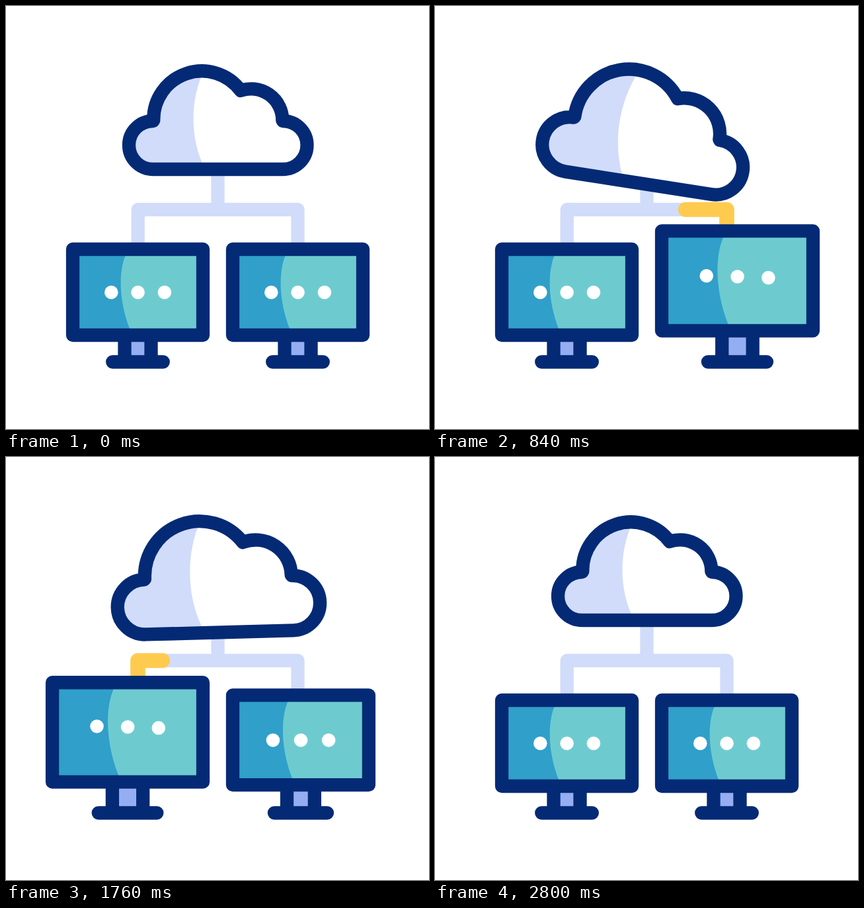
An HTML page for the animation above (3000 ms loop, 640 px wide and 640 px high).

```html
<!DOCTYPE html>
<html lang="en">
<head>
<meta charset="utf-8">
<title>Cloud network</title>
<style>
  @property --tail { syntax: "<length>"; inherits: false; initial-value: 251px; }
  @property --head { syntax: "<length>"; inherits: false; initial-value: 251px; }

  html, body { margin: 0; height: 100%; overflow: hidden; background: #fff; }
  svg { display: block; width: 640px; height: 640px; }

  path, rect { vector-effect: non-scaling-stroke; }
  .line {
    fill: none; stroke: #042a75; stroke-width: 20.3;
    stroke-linecap: round; stroke-linejoin: round;
  }
  .wire { stroke: #d1dcfa; }
  .pulse {
    stroke: #ffcb4f; stroke-width: 22.6;
    stroke-dasharray: calc(var(--head) - var(--tail)) 999px;
    stroke-dashoffset: calc(var(--tail) * -1);
  }
  .dot { stroke: #fff; stroke-width: 20.6; }

  .anim {
    animation-duration: 3s;
    animation-iteration-count: infinite;
    animation-timing-function: cubic-bezier(.333, 0, .667, 1);
    animation-delay: var(--delay, 0s);
  }

  .cloud { transform-origin: 320.8px 173px; animation-name: bob, tilt, swell; }
  .monitor { animation-name: grow; }
  .right { --big: 1.162; transform-origin: 343px 538.5px; }
  .left { --big: 1.157; transform-origin: 298px 538.5px; --delay: -2.1s; }
  .pulse { animation-name: head, tail; }
  .dot { animation-name: wave; --delay: calc(var(--start) + var(--i) * 35ms); }
  .right .dot { --start: 0s; }
  .left .dot { --start: -2.12s; }

  @keyframes bob {
    0%, 6.667% { translate: 0 0; }
    25.667% { translate: 0 13.4px; }
    44.333% { translate: 0 -24.5px; }
    63% { translate: 0 13.4px; }
    82%, 100% { translate: 0 0; }
  }
  @keyframes tilt {
    0%, 6.667% { rotate: 0deg; }
    28.667% { rotate: 8.9deg; }
    50.667% { rotate: -8.9deg; }
    66.167% { rotate: 5deg; }
    82%, 100% { rotate: 0deg; }
  }
  @keyframes swell {
    0%, 6.667% { scale: 1; }
    20%, 68.667% { scale: 1.137; }
    82%, 100% { scale: 1; }
  }
  @keyframes grow {
    0%, 6.667% { scale: 1; }
    20%, 50% { scale: var(--big); }
    63.333%, 100% { scale: 1; }
  }
  @keyframes head {
    0%, 15.33% { --head: 251px; }
    15.333% { --head: 0px; }
    25.333%, 100% { --head: 251px; }
  }
  @keyframes tail {
    0%, 15.33% { --tail: 251px; }
    15.333%, 23% { --tail: 0px; }
    33%, 100% { --tail: 251px; }
  }
  @keyframes wave {
    0%, 20% { translate: 0 0; }
    31.167% { translate: 0 -8.6px; }
    42.667% { translate: 0 8.6px; }
    50%, 100% { translate: 0 0; }
  }
</style>
</head>
<body>
<svg viewBox="0 0 640 640">
  <defs>
    <g id="body">
      <rect x="421.5" y="498" width="40" height="40" fill="#95aef2"/>
      <path class="line" d="M421.5 498V538.5M461.5 498V538.5M403.2 538.5H479.8"/>
      <rect x="343" y="368" width="197" height="130" fill="#6dcbd0"/>
      <path d="M343 368H425.5L422.5 378C412.5 402 412.5 445 429 488L432.5 498H343Z" fill="#309fc9"/>
      <rect class="line" x="343" y="368" width="197" height="130"/>
    </g>
  </defs>

  <path class="line wire" d="M320.5 235V308M199.7 372V308H441.5V372"/>
  <path class="line pulse anim" d="M320.5 240V308H441.5V370"/>
  <path class="line pulse anim" style="--delay:-2.1s" d="M320.5 240V308H199.5V370"/>

  <g class="monitor right anim">
    <use href="#body"/>
    <path class="line dot anim" style="--i:0" d="M401.3 433.3h.01"/>
    <path class="line dot anim" style="--i:1" d="M441.6 433.3h.01"/>
    <path class="line dot anim" style="--i:2" d="M481.9 433.3h.01"/>
  </g>

  <g class="monitor left anim">
    <use href="#body" x="-242"/>
    <path class="line dot anim" style="--i:0" d="M159.3 433.3h.01"/>
    <path class="line dot anim" style="--i:1" d="M199.6 433.3h.01"/>
    <path class="line dot anim" style="--i:2" d="M239.9 433.3h.01"/>
  </g>

  <g class="cloud anim">
    <path id="shape" fill="#fff" d="M222.5 247A36.5 36.5 0 0 1 222.5 174L223.3 173A73 73 0 0 1 355 128A47.5 47.5 0 0 1 418.3 173L419 174A36.5 36.5 0 0 1 419 247Z"/>
    <path fill="#d1dcfa" d="M222.5 247A36.5 36.5 0 0 1 222.5 174L223.3 173A73 73 0 0 1 299 99C278 143 278 203 301.5 247Z"/>
    <path class="line" d="M222.5 247A36.5 36.5 0 0 1 222.5 174L223.3 173A73 73 0 0 1 355 128A47.5 47.5 0 0 1 418.3 173L419 174A36.5 36.5 0 0 1 419 247Z"/>
  </g>
</svg>
</body>
</html>
```
